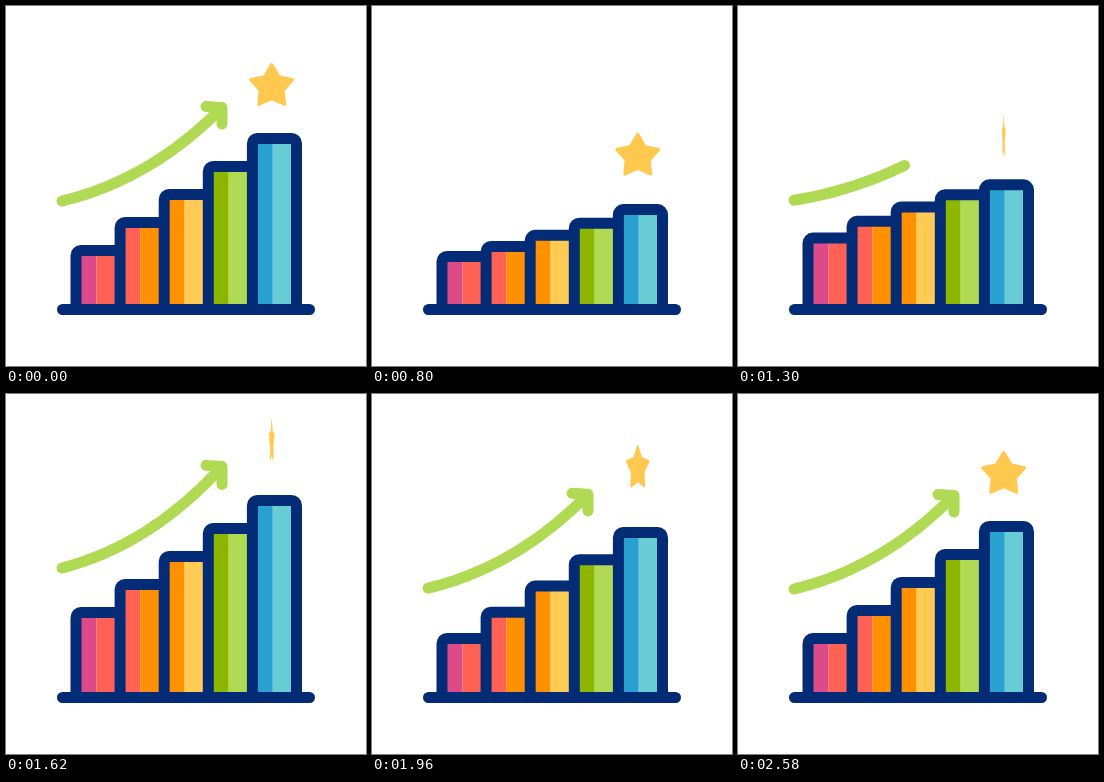
An HTML page with a canvas that plays this animation: 360x360 px, repeating every 2800 ms.

```html
<!DOCTYPE html>
<html lang="en">
<head>
<meta charset="utf-8">
<title>Growth chart</title>
<style>
  html, body { margin: 0; width: 100%; height: 100%; overflow: hidden; background: #fff; }
  canvas { display: block; width: 360px; height: 360px; }
</style>
</head>
<body>
<canvas id="stage"></canvas>
<script>
const LOOP = 2800, STEP = 20, SIZE = 360;
const NAVY = '#042b76', LIME = '#b0da53', GOLD = '#ffc94f';
const LINE = 11, BASE_Y = 303.5;

const canvas = document.getElementById('stage');
const ratio = window.devicePixelRatio || 1;
canvas.width = canvas.height = SIZE * ratio;
const ctx = canvas.getContext('2d');

const clamp = v => Math.max(0, Math.min(1, v));
const ease = (t, from, to) => {
  const x = clamp((t - from) / (to - from));
  return x * x * (3 - 2 * x);
};

// Vertical offset: sink, leap past the rest position, dip slightly, settle.
function bounce(t, m) {
  const [riseFrom, riseTo] = m.rise;
  const fallTo = m.fall + 250;
  return m.low * ease(t, m.drop, m.drop + 650)
    - (m.low + m.peak) * ease(t, riseFrom, riseTo)
    + (m.peak + m.dip) * ease(t, m.fall, fallTo)
    - m.dip * ease(t, fallTo, fallTo + 350);
}

const BAR_COLORS = [
  ['#dc4a8a', '#ff6154'],
  ['#ff6154', '#ff9100'],
  ['#ff9100', '#ffcb55'],
  ['#8db600', '#b0da53'],
  ['#28a0d0', '#68ccd4']
];

const bars = BAR_COLORS.map((colors, i) => ({
  colors,
  left: 70 + 44.1 * i,
  right: 70 + 44.1 * (i + 1),
  top: 244.5 - 28 * i,
  isLast: i === 4,
  motion: {
    low: 6.2 + 19 * i, peak: 26, dip: 1.8 * i,
    drop: 220 + 20 * i,
    rise: [1035 + 20 * i, 1515 + 20 * i],
    fall: 1660 + 20 * i
  }
}));

const starMotion = { low: 84, peak: 40, dip: 8, drop: 320, rise: [1087, 1714], fall: 1800 };
const arrowTiming = { dip: 0, drop: 220, rise: [1150, 1610], fall: 1740 };
const tailMotion = { ...arrowTiming, low: 6, peak: 21 };
const tipMotion = { ...arrowTiming, low: 48, peak: 29 };

function drawBar(bar, t) {
  const { left, right, colors } = bar;
  const top = bar.top + bounce(t, bar.motion);
  const split = left + 20.4;
  ctx.fillStyle = colors[0];
  ctx.fillRect(left, top, split - left, BASE_Y - top);
  ctx.fillStyle = colors[1];
  ctx.fillRect(split, top, right - split, BASE_Y - top);

  ctx.beginPath();
  ctx.moveTo(left, BASE_Y);
  ctx.arcTo(left, top, right, top, 5);
  if (bar.isLast) {
    ctx.arcTo(right, top, right, BASE_Y, 5);
    ctx.lineTo(right, BASE_Y);
  } else {
    ctx.lineTo(right, top);
  }
  ctx.strokeStyle = NAVY;
  ctx.stroke();
}

function drawBaseline() {
  ctx.beginPath();
  ctx.moveTo(56.5, BASE_Y);
  ctx.lineTo(303.5, BASE_Y);
  ctx.strokeStyle = NAVY;
  ctx.stroke();
}

const TAIL = [56, 195], BEND = [144, 174], TIP = [215.5, 102];
const shaftPoint = u => [0, 1].map(k =>
  (1 - u) ** 2 * TAIL[k] + 2 * u * (1 - u) * BEND[k] + u * u * TIP[k]);

function drawArrow(t) {
  const from = ease(t, 220, 760);
  const to = ease(t, 1060, 1450);
  const redrawn = t > 1060;
  if (!redrawn && from >= 1) return;
  const start = redrawn ? 0 : from;
  const end = redrawn ? to : 1;

  const tailY = TAIL[1] + bounce(t, tailMotion);
  const tipY = TIP[1] + bounce(t, tipMotion);
  const scale = (tailY - tipY) / (TAIL[1] - TIP[1]);
  const place = ([x, y]) => [x, tailY + (y - TAIL[1]) * scale];

  ctx.strokeStyle = LIME;
  ctx.beginPath();
  const pieces = 40;
  for (let i = 0; i <= pieces; i++) {
    ctx.lineTo(...place(shaftPoint(start + (end - start) * i / pieces)));
  }
  ctx.stroke();

  const head = redrawn ? clamp((to - 0.85) / 0.15) : clamp((1 - from) / 0.15);
  if (head > 0) {
    ctx.beginPath();
    ctx.moveTo(...place([TIP[0] - 15.5 * head, TIP[1] - 1.5]));
    ctx.lineTo(...place([TIP[0] + 0.5, TIP[1] - 0.5]));
    ctx.lineTo(...place([TIP[0] + 0.5, TIP[1] + 16 * head]));
    ctx.stroke();
  }
}

function drawStar(t) {
  const spin = clamp((t - 858) / 1200) * 4 * Math.PI;
  ctx.save();
  ctx.translate(265.7, 80.5 + bounce(t, starMotion));
  ctx.scale(Math.cos(spin), 1);
  ctx.beginPath();
  for (let i = 0; i < 10; i++) {
    const radius = i % 2 ? 12.2 : 22;
    const angle = i * Math.PI / 5 - Math.PI / 2;
    ctx.lineTo(radius * Math.cos(angle), radius * Math.sin(angle));
  }
  ctx.closePath();
  ctx.fillStyle = ctx.strokeStyle = GOLD;
  ctx.lineWidth = 3;
  ctx.fill();
  ctx.stroke();
  ctx.restore();
}

function render(now) {
  const t = Math.floor((now % LOOP) / STEP) * STEP;
  ctx.setTransform(ratio, 0, 0, ratio, 0, 0);
  ctx.fillStyle = '#fff';
  ctx.fillRect(0, 0, SIZE, SIZE);
  ctx.lineWidth = LINE;
  ctx.lineCap = ctx.lineJoin = 'round';
  bars.forEach(bar => drawBar(bar, t));
  drawBaseline();
  drawArrow(t);
  drawStar(t);
}

const begin = performance.now();
function tick() {
  render(performance.now() - begin);
  requestAnimationFrame(tick);
}
tick();
</script>
</body>
</html>
```
